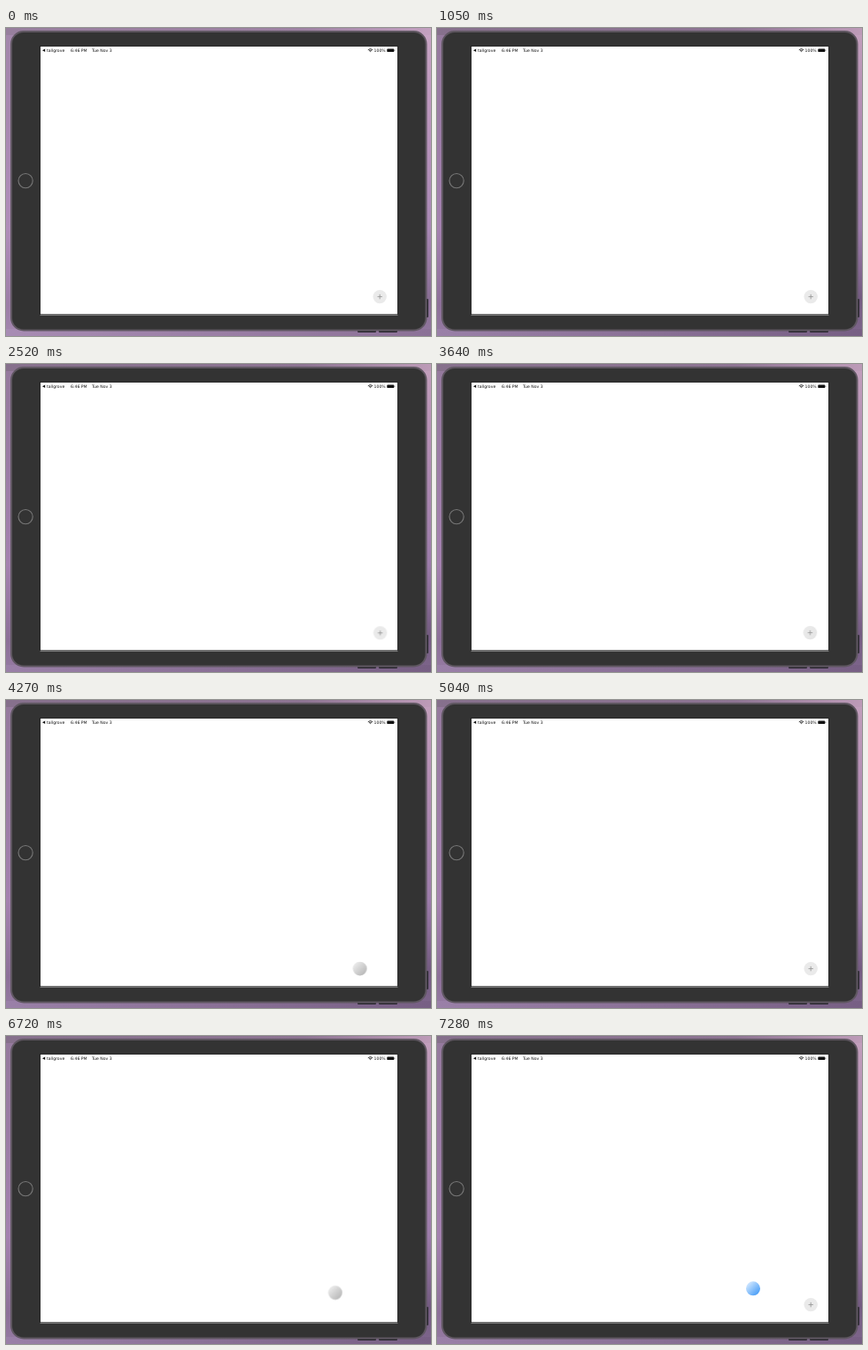
An HTML page for the animation above (8 s loop, 480 px wide and 348 px high).

```html
<!DOCTYPE html>
<html lang="en">
<head>
<meta charset="utf-8">
<title>Drag the add button</title>
<style>
  html, body { margin: 0; width: 100%; height: 100%; overflow: hidden; background: #97799f; }
  svg { display: block; width: 480px; height: 348px; }
  text { font-family: "DejaVu Sans", sans-serif; font-size: 4.6px; fill: #111; }

  .drag, .shade, .dropped, .glow { animation: 8s step-end -1ms infinite; }
  .drag { animation-name: drag; }
  .shade { animation-name: shade; }
  .dropped { animation-name: drop; }
  .glow { animation-name: glow; }

  /* Every move advances in 70 ms ticks. */
  @keyframes drag {
    0% { transform: translate(0, 0); }
    /* short pull up and left, then spring back */
    16.625% { transform: translate(0, 0); animation-timing-function: steps(4, start); }
    20.125% { transform: translate(-4px, -2px); animation-timing-function: steps(4, start); }
    23.625% { transform: translate(-15px, -7px); animation-timing-function: steps(4, start); }
    27.125% { transform: translate(-20px, -9.3px); animation-timing-function: steps(2, start); }
    28.875% { transform: translate(-8px, -4px); animation-timing-function: steps(2, start); }
    30.625% { transform: translate(.6px, .3px); animation-timing-function: steps(1, start); }
    31.5% { transform: translate(.8px, .4px); animation-timing-function: steps(2, start); }
    33.25% { transform: translate(0, 0); }
    /* level pull, then spring back */
    45.5% { transform: translate(0, 0); animation-timing-function: steps(2, start); }
    47.25% { transform: translate(-1.6px, 0); animation-timing-function: steps(6, start); }
    52.5% { transform: translate(-17px, 0); animation-timing-function: steps(4, start); }
    56% { transform: translate(-28px, 0); animation-timing-function: steps(1, start); }
    56.875% { transform: translate(-30px, .2px); }
    58.625% { transform: translate(-30px, .2px); animation-timing-function: steps(2, start); }
    60.375% { transform: translate(-10px, 0); animation-timing-function: steps(2, start); }
    62.125% { transform: translate(.8px, 0); animation-timing-function: steps(2, start); }
    63.875% { transform: translate(0, 0); }
    /* long pull, released as a blue ball */
    76.125% { transform: translate(0, 0); animation-timing-function: steps(2, start); }
    77.875% { transform: translate(-4px, -.3px); animation-timing-function: steps(3, start); }
    80.5% { transform: translate(-17.5px, -3.2px); animation-timing-function: steps(4, start); }
    84% { transform: translate(-45px, -12px); animation-timing-function: steps(3, start); }
    86.625% { transform: translate(-61px, -16.5px); animation-timing-function: steps(2, start); }
    88.375% { transform: translate(-64px, -17.8px); }
    91%, 100% { transform: translate(0, 0); }
  }
  @keyframes shade {
    0% { opacity: 0; }
    16.625% { opacity: 0; animation-timing-function: steps(12, start); }
    27.125% { opacity: .95; animation-timing-function: steps(4, start); }
    30.625% { opacity: 0; }
    45.5% { opacity: 0; animation-timing-function: steps(10, start); }
    54.25% { opacity: 1; }
    58.625% { opacity: 1; animation-timing-function: steps(4, start); }
    62.125% { opacity: 0; }
    76.125% { opacity: 0; animation-timing-function: steps(5, start); }
    80.5% { opacity: .87; animation-timing-function: steps(4, start); }
    84% { opacity: 1; }
    91%, 100% { opacity: 0; }
  }
  @keyframes drop {
    0% { opacity: 0; }
    91%, 100% { opacity: 1; }
  }
  @keyframes glow {
    0% { opacity: .2; }
    1.75% { opacity: .1; }
    13.125%, 100% { opacity: 0; }
  }
</style>
</head>
<body>
<svg viewBox="0 0 480 348">
  <defs>
    <linearGradient id="wall" x2="0" y2="1">
      <stop offset="0" stop-color="#957a9d"/>
      <stop offset=".3" stop-color="#9b7ca5"/>
      <stop offset=".65" stop-color="#a582b0"/>
      <stop offset=".9" stop-color="#8d7099"/>
      <stop offset="1" stop-color="#957ba2"/>
    </linearGradient>
    <linearGradient id="wallRight" x2="0" y2="1">
      <stop offset="0" stop-color="#c3a0bd"/>
      <stop offset=".25" stop-color="#b58fb5"/>
      <stop offset=".65" stop-color="#9c7caa"/>
      <stop offset=".88" stop-color="#735b80"/>
      <stop offset="1" stop-color="#7e668c"/>
    </linearGradient>
    <linearGradient id="wallTop">
      <stop offset="0" stop-color="#86708c"/>
      <stop offset=".7" stop-color="#8d7492"/>
      <stop offset="1" stop-color="#bd9bb8"/>
    </linearGradient>
    <linearGradient id="wallBottom">
      <stop offset="0" stop-color="#9a80a8"/>
      <stop offset=".5" stop-color="#8a7096"/>
      <stop offset="1" stop-color="#775f84"/>
    </linearGradient>
    <linearGradient id="grey" x1=".1" y1=".1" x2=".9" y2=".9">
      <stop offset="0" stop-color="#ededed"/>
      <stop offset="1" stop-color="#b6b6b6"/>
    </linearGradient>
    <linearGradient id="blue" x1=".1" y1=".1" x2=".9" y2=".9">
      <stop offset="0" stop-color="#d6eaff"/>
      <stop offset="1" stop-color="#449bf7"/>
    </linearGradient>
  </defs>

  <rect width="480" height="348" fill="url(#wall)"/>
  <rect x="456" width="24" height="348" fill="url(#wallRight)"/>
  <rect width="480" height="8" fill="url(#wallTop)"/>
  <rect y="340" width="480" height="8" fill="url(#wallBottom)"/>
  <rect class="glow" width="480" height="348" fill="#d9b8de"/>

  <g fill="#2b2830">
    <rect x="397" y="341" width="21" height="3" rx="1"/>
    <rect x="421" y="341" width="21" height="3" rx="1"/>
    <rect x="474" y="306" width="3" height="21" rx="1"/>
  </g>
  <rect x="6" y="4" width="468.5" height="337.5" rx="14" fill="#333" stroke="#5f5761" stroke-width="2"/>
  <circle cx="22.1" cy="172.6" r="8.1" fill="none" stroke="#777" stroke-width="1.1"/>
  <rect x="38.5" y="20.5" width="404" height="304" fill="#fff"/>
  <rect x="38.5" y="20.5" width="404" height="303" fill="#fff" stroke="none"/>
  <rect x="38.5" y="20.5" width="404" height="303.3" fill="none" stroke="#1c1c1c" stroke-width=".9"/>

  <path d="M41 25.2l3.2-1.8v3.6z" fill="#111"/>
  <text x="46" y="27">tallgrove</text>
  <text x="73" y="27">6:46 PM</text>
  <text x="97" y="27">Tue Nov 3</text>
  <g fill="none" stroke="#222" stroke-width=".9">
    <path d="M408.8 24.7q2.7-2.3 5.4 0M409.9 25.9q1.6-1.3 3.2 0"/>
    <path d="M411.5 26.3v.8"/>
  </g>
  <text x="415.6" y="27">100%</text>
  <rect x="430.3" y="23.5" width="8" height="3.6" rx=".9" fill="#111"/>
  <rect x="438.6" y="24.6" width=".6" height="1.4" fill="#444"/>

  <circle class="dropped" cx="357" cy="285.3" r="8" fill="url(#blue)"/>
  <g class="drag">
    <circle cx="422.2" cy="303.6" r="7.7" fill="#eaeaea"/>
    <path d="M419.5 303.6h5.4m-2.7-2.7v5.4" stroke="#909090" stroke-width=".8"/>
    <circle class="shade" cx="422.2" cy="303.6" r="7.8" fill="url(#grey)"/>
  </g>
</svg>
</body>
</html>
```
